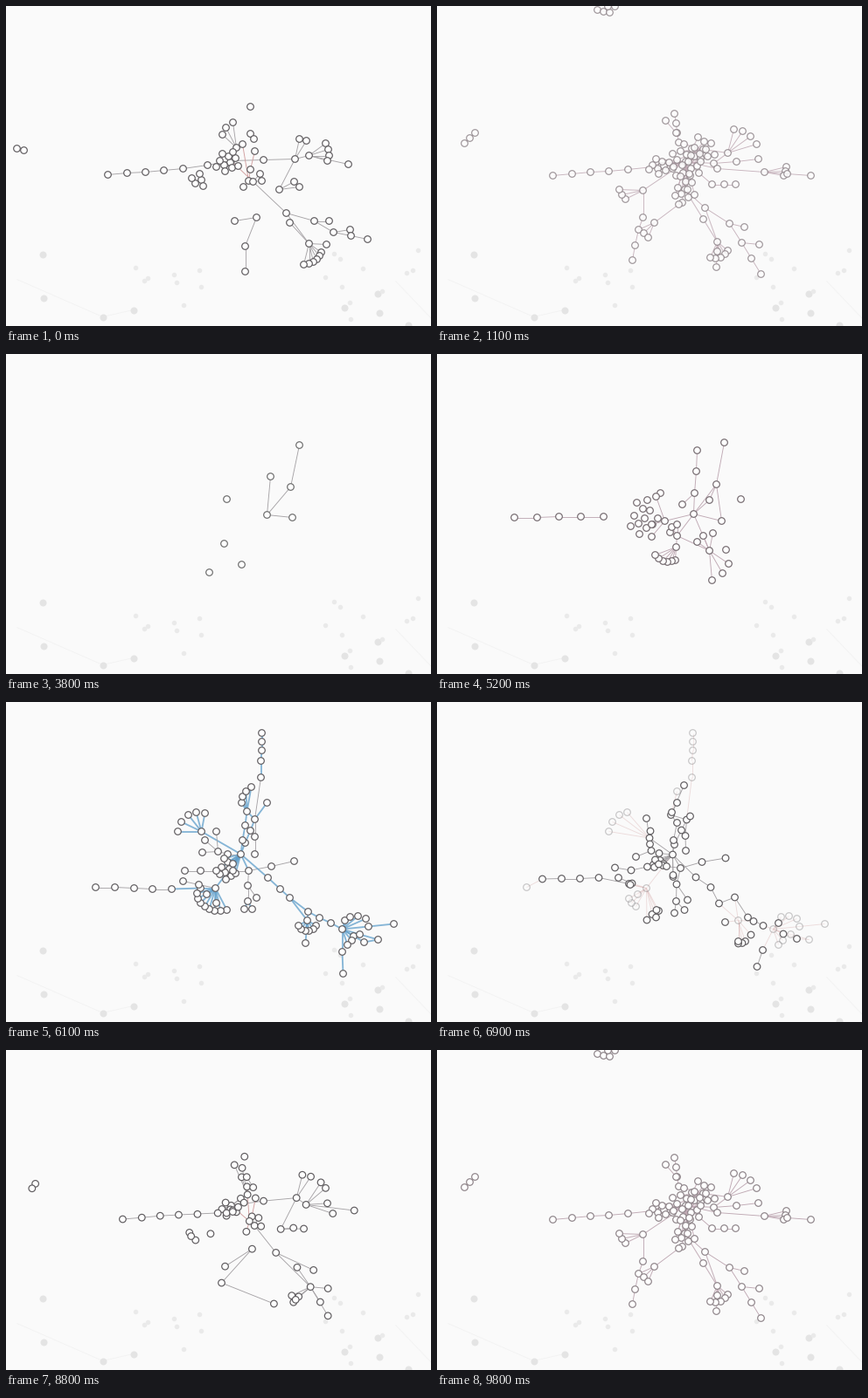
These frames come from a looping animation (486 px wide and 367 px high, 9900 ms). A matplotlib script:

```python
import numpy as np
import matplotlib.pyplot as plt
from matplotlib.animation import FuncAnimation
from matplotlib.collections import LineCollection

W, H, DPI = 486, 367, 64
PX = 72 / DPI
STEP, FRAMES = 100, 99
GRAY = np.array([0.65, 0.64, 0.65])
BLUE = np.array([0.33, 0.62, 0.82])
RED = np.array([0.82, 0.62, 0.62])
MAUVE = np.array([0.75, 0.66, 0.70])


class Net:
    """Graph snapshot grown from hubs by lines, fans and clouds."""

    def __init__(self, ink=(0.38, 0.37, 0.38), base=GRAY, tint=GRAY):
        self.ids, self.edges = {}, {}
        self.ink, self.base, self.tint = ink, base, tint

    def node(self, p):
        key = (round(p[0]), round(p[1]))
        return self.ids.setdefault(key, len(self.ids))

    def chain(self, *pts, hot=False):
        ids = [self.node(p) for p in pts]
        for e in zip(ids, ids[1:]):
            e = tuple(sorted(e))
            self.edges[e] = self.edges.get(e, False) or hot

    def line(self, p, q, n, ease=1, hot=False):
        """Chain from p to q in n steps."""
        p, q = np.array(p), np.array(q)
        self.chain(*[p + (q - p) * (k / n) ** ease for k in range(n + 1)], hot=hot)

    def fan(self, hub, n, radii, angles, hot=False):
        """Leaves around a hub; radius and angle (degrees) run evenly."""
        for r, a in zip(np.linspace(*radii, n), np.radians(np.linspace(*angles, n))):
            self.chain(hub, (hub[0] + r * np.cos(a), hub[1] + r * np.sin(a)), hot=hot)

    def cloud(self, mid, n, rx, ry, hub=None, hot=False):
        """Evenly packed ellipse of nodes, tied to a hub if given."""
        for k in range(n):
            r, a = np.sqrt((k + 0.5) / n), 2.4 * k
            p = (mid[0] + rx * r * np.cos(a), mid[1] + ry * r * np.sin(a))
            self.chain(*([hub, p] if hub else [p]), hot=hot)

    @property
    def pos(self):
        return np.array(list(self.ids), float)


def first_net():
    n = Net((0.43, 0.43, 0.43))
    hub, top, mid, low, left, joint = ((306, 200), (277, 161), (274, 216),
                                       (239, 226), (168, 230), (258, 195))
    n.line(hub, (377, 75), 3, 0.73)
    n.fan(hub, 5, (31, 44), (-68, 52))
    n.fan(top, 2, (34, 38), (-124, -87))
    n.chain(hub, top, joint, mid, hub, low, joint)
    n.chain(mid, (244, 214), low, (261, 255), (294, 242), hub)
    n.chain(mid, (280, 250), (294, 242))
    n.chain((223, 256), low, left)
    n.line(left, (111, 183), 2)
    n.line(left, (88, 252), 2)
    n.fan(left, 2, (30, 30), (120, 180))
    return n


def sparse_net():
    n = Net((0.43, 0.43, 0.43))
    hub = (298, 184)
    n.chain((335, 104), (325, 152), hub, (302, 140))
    n.chain(hub, (327, 187))
    for p in [(252, 166), (249, 217), (269, 241), (232, 250)]:
        n.node(p)
    return n


def second_net():
    n = Net((0.46, 0.42, 0.44), MAUVE, MAUVE)
    hub, left, mid, low, right = ((293, 183), (260, 191), (274, 208),
                                  (273, 221), (311, 225))
    n.line((88, 187), (190, 186), 4)
    n.chain(hub, (319, 149), (328, 101))
    n.line(hub, (297, 110), 3)
    n.chain((280, 172), (294, 159))
    n.chain(hub, (311, 167), (319, 149), (325, 191), hub)
    for p in (left, mid, right):
        n.chain(hub, p, hot=True)
    n.chain(right, mid, low)
    n.chain((255, 159), (250, 163), left)
    n.cloud((234, 188), 11, 15, 24)
    n.fan(left, 3, (8, 23), (200, 130), hot=True)
    n.fan(mid, 3, (9, 13), (-150, -90))
    n.fan(low, 6, (15, 26), (95, 160), hot=True)
    n.fan(right, 3, (17, 20), (-144, -79))
    n.fan(right, 3, (27, 34), (34, 85))
    n.node((347, 166))
    n.node((330, 224))
    return n


def third_net():
    n = Net()
    hub, knot, fork, top, side, twig = ((268, 174), (239, 213), (284, 134),
                                        (275, 125), (223, 148), (277, 193))
    bend, near, far = (324, 224), (344, 250), (384, 260)
    n.line((102, 212), (189, 214), 4)
    n.line((189, 214), knot, 2, 0.6, hot=True)
    n.chain(fork, (291, 86))
    n.line((291, 86), (292, 35), 4, 0.73, hot=True)
    n.line(fork, (284, 174), 2)
    n.chain((298, 115), fork, top, hot=True)
    n.line(fork, hub, 3, hot=True)
    n.line(top, hub, 3, hot=True)
    n.fan(top, 4, (12, 28), (-121, -80), hot=True)
    n.fan(side, 5, (27, 21), (180, 281), hot=True)
    n.chain(side, hub, knot, hot=True)
    n.chain((242, 171), (253, 174), hub)
    n.fan((242, 171), 3, (18, 23), (177, 265))
    n.cloud((253, 191), 10, 10, 16, hub, hot=True)
    n.chain(hub, twig, hot=True)
    n.line(twig, (204, 193), 4)
    n.line(twig, (329, 182), 2)
    n.line(twig, (276, 228), 2)
    n.chain((276, 210), (286, 224))
    n.fan((276, 228), 2, (10, 10), (115, 60), hot=True)
    n.line(knot, (202, 205), 2)
    n.fan(knot, 8, (28, 22), (62, 164), hot=True)
    n.fan(knot, 2, (17, 12), (88, 145), hot=True)
    n.line(hub, bend, 3, 0.55, hot=True)
    n.chain(bend, (345, 240), near, bend, hot=True)
    n.line((345, 240), far, 3, hot=True)
    n.fan(near, 6, (12, 12), (30, 150), hot=True)
    n.chain(near, (342, 276), hot=True)
    n.fan(far, 4, (10, 30), (-72, -24), hot=True)
    n.fan(far, 3, (15, 19), (30, 70), hot=True)
    n.line(far, (443, 254), 2, hot=True)
    n.line(far, (425, 272), 2, hot=True)
    n.line(far, (385, 311), 2, hot=True)
    n.chain(far, (409, 275), (425, 272), hot=True)
    return n


def fourth_net(full):
    """Fan-shaped graph; the full form has the extra, highlighted branches."""
    n = Net(tint=GRAY if full else RED)
    hub, up, gate, crown, arm = (257, 177), (263, 162), (330, 175), (346, 171), (312, 210)
    root, turn, fork, tuft, tail = (282, 201), (320, 237), (352, 246), (346, 272), (374, 259)
    n.chain((12, 163), (20, 165))
    n.line((116, 193), (202, 186), 4)
    n.line((202, 186), hub, 2)
    n.line(hub, gate, 2, hot=full)
    n.chain(arm, gate, crown, hot=full)
    n.fan(gate, 2, (24, 25), (-78, -58), hot=full)
    n.fan(crown, 4, (24, 22), (-36, 17), hot=full)
    n.chain(crown, (391, 181))
    n.fan(arm, 2, (19, 23), (-28, -7), hot=full)
    n.fan(up, 3, (22, 29), (-138, -98))
    n.chain((270, 158), up, hub)
    n.chain((279, 146), (283, 152))
    n.node((279, 115))
    n.cloud((253, 179), 11, 15, 14, hub)
    n.cloud((220, 199), 5, 9, 10)
    n.chain((284, 166), (279, 187), (277, 200), (271, 207), hot=not full)
    n.chain((270, 158), (277, 200), hot=not full)
    n.chain(hub, root, hot=not full)
    n.fan(root, 2, (12, 10), (-50, -6))
    n.chain(root, turn)
    n.chain(turn, fork, (369, 246), hot=full)
    n.chain(fork, tail, (393, 256), hot=full)
    n.line(tail, (413, 267), 2)
    n.chain(turn, tuft, (324, 248))
    n.chain(tuft, (366, 273))
    n.fan(tuft, 6, (17, 25), (35, 103))
    n.chain((261, 246), (286, 242), (273, 275), (273, 304))
    if not full:
        return n

    loop, stem, drop = (270, 246), (275, 253), (303, 225)
    n.chain((3, 162), (12, 163))
    n.chain((284, 93), (279, 115), (275, 135), up)
    n.fan((275, 135), 3, (11, 13), (0, 135))
    n.cloud((267, 165), 5, 5, 15, hub)
    n.chain((302, 178), (336, 179), (391, 181), hot=True)
    n.chain(arm, (286, 229), loop, stem, root, drop, turn, hot=True)
    n.chain(drop, (324, 248))
    n.fan(loop, 3, (32, 17), (154, 200), hot=True)
    n.fan(loop, 4, (18, 10), (-90, 100), hot=True)
    n.fan(stem, 4, (25, 26), (74, 113), hot=True)
    n.chain(stem, (273, 275), (273, 304), hot=True)
    return n


def fifth_net():
    n = Net((0.56, 0.52, 0.54), MAUVE, MAUVE)
    hub, left, right, low = (284, 178), (256, 183), (304, 164), (283, 210)
    n.line((183, 4), (197, 7), 2)
    n.chain((190, 6), (195, 0), (203, 0))
    n.line((31, 157), (43, 145), 2)
    n.line((132, 194), (218, 187), 4)
    n.chain((218, 187), left)
    n.line((271, 123), (276, 156), 3)
    n.chain((261, 131), (273, 145))
    for p in (left, right, low):
        n.chain(hub, p, hot=True)
    n.cloud(left, 10, 15, 11, hub, hot=True)
    n.cloud(hub, 17, 20, 21, right, hot=True)
    n.cloud(right, 10, 15, 18, hub, hot=True)
    n.cloud(low, 11, 13, 20, hub, hot=True)

    knee, elbow, foot = (235, 211), (248, 248), (230, 256)
    n.fan(knee, 3, (22, 27), (153, 182), hot=True)
    n.chain(hub, knee, (235, 242), foot, elbow, (276, 227))
    n.line(foot, (223, 291), 2)
    n.fan(elbow, 2, (17, 18), (135, 112))

    crown, tail = (332, 168), (374, 190)
    n.chain(right, crown, (316, 180), hub, hot=True)
    n.fan(crown, 4, (28, 34), (-75, -17))
    n.line((316, 180), (367, 175), 2)
    n.chain(hub, (320, 186), tail)
    n.fan(tail, 3, (26, 22), (-13, 10))
    n.line(tail, (427, 194), 2)
    n.chain(hub, (314, 204))
    n.line((314, 204), (341, 204), 2)

    bend, fork, side, tuft = (306, 231), (334, 249), (348, 271), (320, 270)
    n.chain(low, bend, fork, side, (368, 273))
    n.chain(fork, (351, 253))
    n.line(side, (370, 307), 2)
    n.chain(low, (304, 244), tuft, bend, hot=True)
    n.fan(tuft, 5, (16, 20), (40, 114), hot=True)
    n.fan(tuft, 2, (11, 29), (90, 92), hot=True)
    return n


def match(a, b, reach=46):
    """Pair nodes of two nets, closest pairs first."""
    d = np.linalg.norm(a.pos[:, None] - b.pos[None], axis=2)
    pairs, used = {}, set()
    for k in np.argsort(d, axis=None, kind="stable"):
        i, j = divmod(int(k), d.shape[1])
        if d[i, j] > reach:
            break
        if i not in pairs and j not in used:
            pairs[i] = j
            used.add(j)
    return pairs


first, sparse, second, third = first_net(), sparse_net(), second_net(), third_net()
core, fourth, fifth = fourth_net(False), fourth_net(True), fifth_net()

NEVER = (99999, 99999)
# start, from, to, remove, move, add, cool down
STEPS = [(s, a, b, match(a, b), times) for s, a, b, *times in [
    (0, core, fifth, (0, 300), (0, 400), (500, 800), (800, 1000)),
    (1900, first, sparse, (2600, 2900), (3000, 3800), NEVER, NEVER),
    (3800, sparse, second, (3800, 4000), (3800, 4100), (4200, 4700), (4700, 5200)),
    (5200, second, third, (5200, 5500), (5200, 5500), (5600, 6000), (5800, 6600)),
    (6700, third, fourth, (6700, 7000), (6700, 7100), (7200, 7500), (7500, 7900)),
    (8000, fourth, core, (8000, 8400), (8000, 8400), NEVER, NEVER),
    (8500, core, fifth, (8500, 8800), (8500, 8900), (9000, 9400), (9400, 9800)),
]]


def ramp(t, span):
    a, b = span
    return min(max((t - a) / (b - a), 0), 1) if b > a else 0.0


def smooth(u):
    return u * u * (3 - 2 * u)


fig = plt.figure(figsize=(W / DPI, H / DPI), dpi=DPI, facecolor="#fafafa")
ax = fig.add_axes([0, 0, 1, 1])
ax.set(xlim=(-0.5, W - 0.5), ylim=(H - 0.5, -0.5))
ax.axis("off")

# faint backdrop: a few large dots, scattered small ones, thin links
rng = np.random.default_rng(8)
big = np.array([(41, 284), (42, 334), (110, 356), (145, 348),
                (386, 345), (424, 329), (426, 351), (459, 365)])
small = np.vstack([rng.uniform((350, 265), (482, 360), (11, 2)),
                   rng.uniform((145, 285), (270, 365), (8, 2))])
ax.scatter(*big.T, s=(8 * PX) ** 2, c="#e4e4e4", lw=0, zorder=1)
ax.scatter(*small.T, s=(5.5 * PX) ** 2, c="#eaeaea", lw=0, zorder=1)
ax.add_collection(LineCollection(
    [[(12, 313), big[2]], [big[2], big[3]], [(445, 315), (486, 358)]],
    colors="#f2f2f2", linewidths=0.8 * PX, zorder=0))

wires = LineCollection([], zorder=2)
ax.add_collection(wires)
rings = ax.scatter([], [], s=(7.6 * PX) ** 2, linewidths=1.2 * PX, zorder=3)


def paint(net, pos, alpha, edges):
    """edges: list of (i, j, rgb, alpha, width)."""
    wires.set_segments([pos[[i, j]] for i, j, *_ in edges])
    wires.set_color([(*rgb, a) for _, _, rgb, a, _ in edges])
    wires.set_linewidth([w * PX for *_, w in edges])
    rings.set_offsets(pos)
    fill, ink = np.ones((len(pos), 4)), np.ones((len(pos), 4))
    ink[:, :3] = net.ink
    fill[:, 3] = ink[:, 3] = alpha
    rings.set_facecolor(fill)
    rings.set_edgecolor(ink)


def leaving(a, b, pairs, gone, moved):
    pos, goal = a.pos, b.pos
    alpha = np.full(len(pos), 1 - gone)
    for i, j in pairs.items():
        pos[i] += (goal[j] - pos[i]) * moved
        alpha[i] = 1
    edges = []
    for (i, j), hot in a.edges.items():
        kept = i in pairs and j in pairs
        rgb = a.tint if hot else a.base
        if not kept:
            rgb = rgb + (RED - rgb) * min(1, 2 * gone)
        edges.append((i, j, rgb, 1 if kept else 1 - gone, 0.9))
    paint(a, pos, alpha, edges)


def arriving(b, pairs, grown, cooled, fade):
    kept = set(pairs.values())
    alpha = np.array([1 if i in kept else grown for i in range(len(b.ids))]) * fade
    edges = []
    for (i, j), hot in b.edges.items():
        if hot:
            rgb = BLUE + (b.tint - BLUE) * cooled ** 2
            look = grown * (0.85 - 0.4 * cooled * (1 - cooled)), 2.3 - 1.2 * cooled
        else:
            rgb, look = b.base, (1 if i in kept and j in kept else grown, 0.9)
        edges.append((i, j, rgb, look[0] * fade, look[1]))
    paint(b, b.pos, alpha, edges)


def draw(k):
    t = k * STEP
    _, a, b, pairs, (rem, mov, add, cool) = [s for s in STEPS if s[0] <= t][-1]
    if t < add[0]:
        leaving(a, b, pairs, ramp(t, rem), smooth(ramp(t, mov)))
    else:
        fade = 1 - ramp(t, (1000, 1700)) if t < 1900 else 1
        arriving(b, pairs, ramp(t, add), ramp(t, cool), fade)
    return wires, rings


anim = FuncAnimation(fig, draw, frames=FRAMES, interval=STEP,
                     repeat=True, repeat_delay=0)
plt.show()
```
